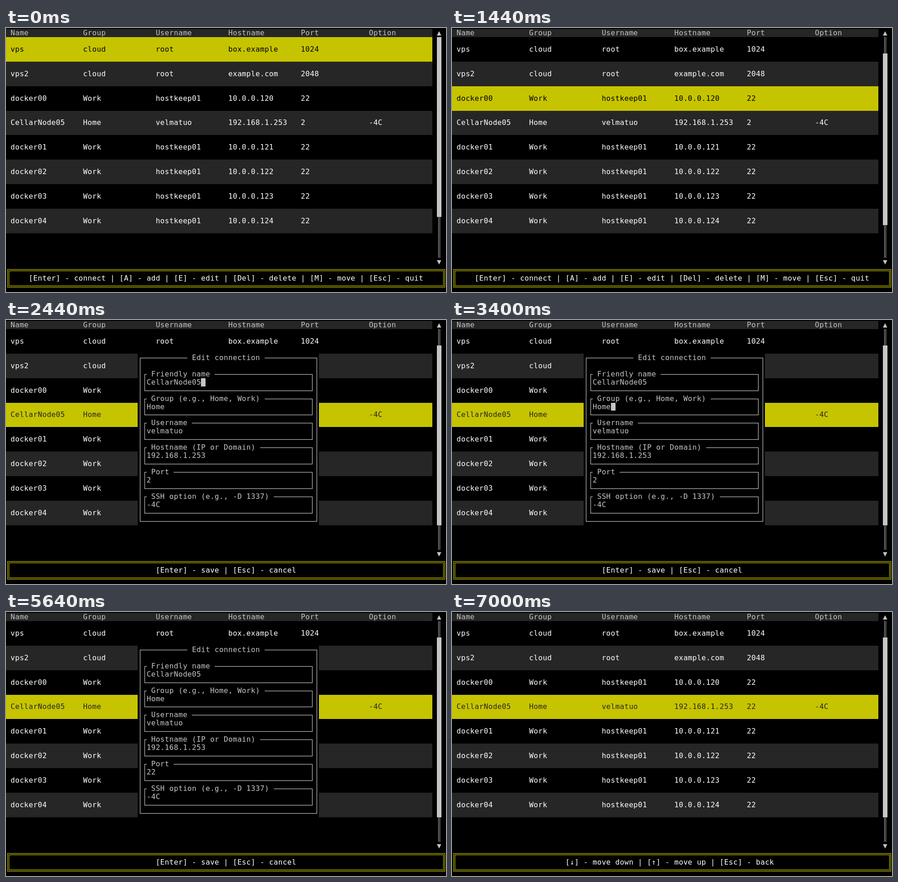
An HTML page with a canvas for the animation above (8000 ms loop, 966x580 px).

```html
<!DOCTYPE html>
<html lang="en">
<head>
<meta charset="utf-8">
<title>Connection list</title>
<style>
  html, body { margin: 0; width: 100%; height: 100%; overflow: hidden; background: #000; }
  canvas { display: block; }
</style>
</head>
<body>
<canvas id="stage" width="966" height="580"></canvas>
<script>
const ctx = document.getElementById('stage').getContext('2d');

// Terminal grid: 97 columns across the stage, cell edges snapped to pixels.
const CELL_W = 966 / 97, CELL_H = 17.95, TOP = 2, BASELINE = 14;
const LOOP = 8000;
const BLACK = '#000', DARK = '#262626', GRAY = '#c6c6c6', WHITE = '#fff', YELLOW = '#c6c400';

const COLUMNS = [1, 17, 33, 49, 65, 80];
const HEADER = ['Name', 'Group', 'Username', 'Hostname', 'Port', 'Option'];
const docker = n => ['docker0' + n, 'Work', 'hostkeep01', '10.0.0.12' + n, '22'];
const HOSTS = [
  ['vps', 'cloud', 'root', 'box.example', '1024'],
  ['vps2', 'cloud', 'root', 'example.com', '2048'],
  docker(0),
  ['CellarNode05', 'Home', 'velmatuo', '192.168.1.253', '2', '-4C'],
  docker(1), docker(2), docker(3), docker(4)
];
const EDITED = 3, PORT = 4;
const LABELS = ['Friendly name', 'Group (e.g., Home, Work)', 'Username',
  'Hostname (IP or Domain)', 'Port', 'SSH option (e.g., -D 1337)'];

const LIST_HELP = '[Enter] - connect | [A] - add | [E] - edit | [Del] - delete | [M] - move | [Esc] - quit';
const EDIT_HELP = '[Enter] - save | [Esc] - cancel';
const MOVE_HELP = '[↓] - move down | [↑] - move up | [Esc] - back';

// Scrollbar thumb [first row, end row] for each selected host.
const THUMB = [[1, 23], [2, 24], [3, 24], [3, 25]];

// Each step changes part of the state from its time on; cursor -1 is hidden.
const STEPS = [
  [0, { selected: 0, port: '2', dialog: false, cursor: -1, help: LIST_HELP }],
  [960, { selected: 1 }],
  [1440, { selected: 2 }],
  [1920, { selected: 3 }],
  [2440, { dialog: true, cursor: 0, help: EDIT_HELP }],
  [3000, { cursor: -1 }],
  [3400, { cursor: 1 }],
  [3680, { cursor: 2 }],
  [4000, { cursor: 3 }],
  [4280, { cursor: 4 }],
  [4840, { cursor: -1 }],
  [5040, { port: '22', cursor: 4 }],
  [5640, { cursor: -1 }],
  [6040, { dialog: false, help: LIST_HELP }],
  [7000, { help: MOVE_HELP }]
];

const stateAt = t =>
  Object.assign({}, ...STEPS.filter(([start]) => start <= t).map(([, change]) => change));

const x = (col, shift = 0) => Math.round(col * CELL_W + shift);
const y = (row, shift = 0) => Math.round(TOP + row * CELL_H + shift);

function cells(col, row, endCol, endRow, color) {
  ctx.fillStyle = color;
  ctx.fillRect(x(col), y(row), x(endCol) - x(col), y(endRow) - y(row));
}

function text(str, col, row, color) {
  ctx.fillStyle = color;
  [...str].forEach((ch, i) => {
    if (ch !== ' ') ctx.fillText(ch, (col + i) * CELL_W, y(row, BASELINE));
  });
}

// Thin frame through the centres of its corner cells.
function frame(col, row, endCol, endRow, color, grow = 0) {
  const left = x(col + 0.5, -grow), top = y(row + 0.5, -grow);
  const right = x(endCol + 0.5, grow), bottom = y(endRow + 0.5, grow);
  ctx.strokeStyle = color;
  ctx.strokeRect(left + 0.5, top + 0.5, right - left, bottom - top);
}

function caption(str, col, row) {
  cells(col, row, col + str.length + 2, row + 1, BLACK);
  text(str, col + 1, row, GRAY);
}

const valuesOf = (i, port) =>
  HOSTS[i].map((value, c) => i === EDITED && c === PORT ? port : value);

function drawTable({ selected, port }) {
  cells(0, 0, 94, 1, DARK);
  HEADER.forEach((title, i) => text(title, COLUMNS[i], 0, GRAY));
  HOSTS.forEach((host, i) => {
    const row = 1 + i * 3, shade = i % 2 ? DARK : BLACK, active = i === selected;
    cells(0, row, 94, row + 3, active ? YELLOW : shade);
    valuesOf(i, port).forEach((value, c) =>
      text(value, COLUMNS[c], row + 1, active ? shade : WHITE));
  });
}

function drawScrollbar(selected) {
  text('▲', 95, 0, GRAY);
  text('▼', 95, 28, GRAY);
  ctx.fillStyle = GRAY;
  for (const shift of [-2, 1]) ctx.fillRect(x(95.5, shift), y(1), 1, y(28) - y(1));
  const [start, end] = THUMB[selected];
  cells(95, start, 96, end, GRAY);
}

function drawDialog({ port, cursor }) {
  const values = valuesOf(EDITED, port);
  cells(29, 4, 69, 25, BLACK);
  frame(29, 4, 68, 24, GRAY);
  caption('Edit connection', 40, 4);
  LABELS.forEach((label, i) => {
    const row = 6 + i * 3;
    frame(30, row, 67, row + 2, GRAY);
    caption(label, 31, row);
    text(values[i], 31, row + 1, GRAY);
    if (i === cursor) {
      const col = 31 + values[i].length;
      cells(col, row + 1, col + 1, row + 2, GRAY);
    }
  });
}

function drawHelp(help) {
  frame(0, 29, 96, 31, YELLOW, 1.5);
  frame(0, 29, 96, 31, YELLOW, -1.5);
  text(help, Math.floor((97 - help.length) / 2), 30, WHITE);
}

function draw(t) {
  const state = stateAt(t);
  ctx.fillStyle = BLACK;
  ctx.fillRect(0, 0, 966, 580);
  ctx.font = '16px "DejaVu Sans Mono", monospace';
  ctx.lineWidth = 1.2;
  drawTable(state);
  drawScrollbar(state.selected);
  if (state.dialog) drawDialog(state);
  drawHelp(state.help);
}

const began = performance.now();
function tick() {
  draw((performance.now() - began) % LOOP);
  requestAnimationFrame(tick);
}
tick();
</script>
</body>
</html>
```
